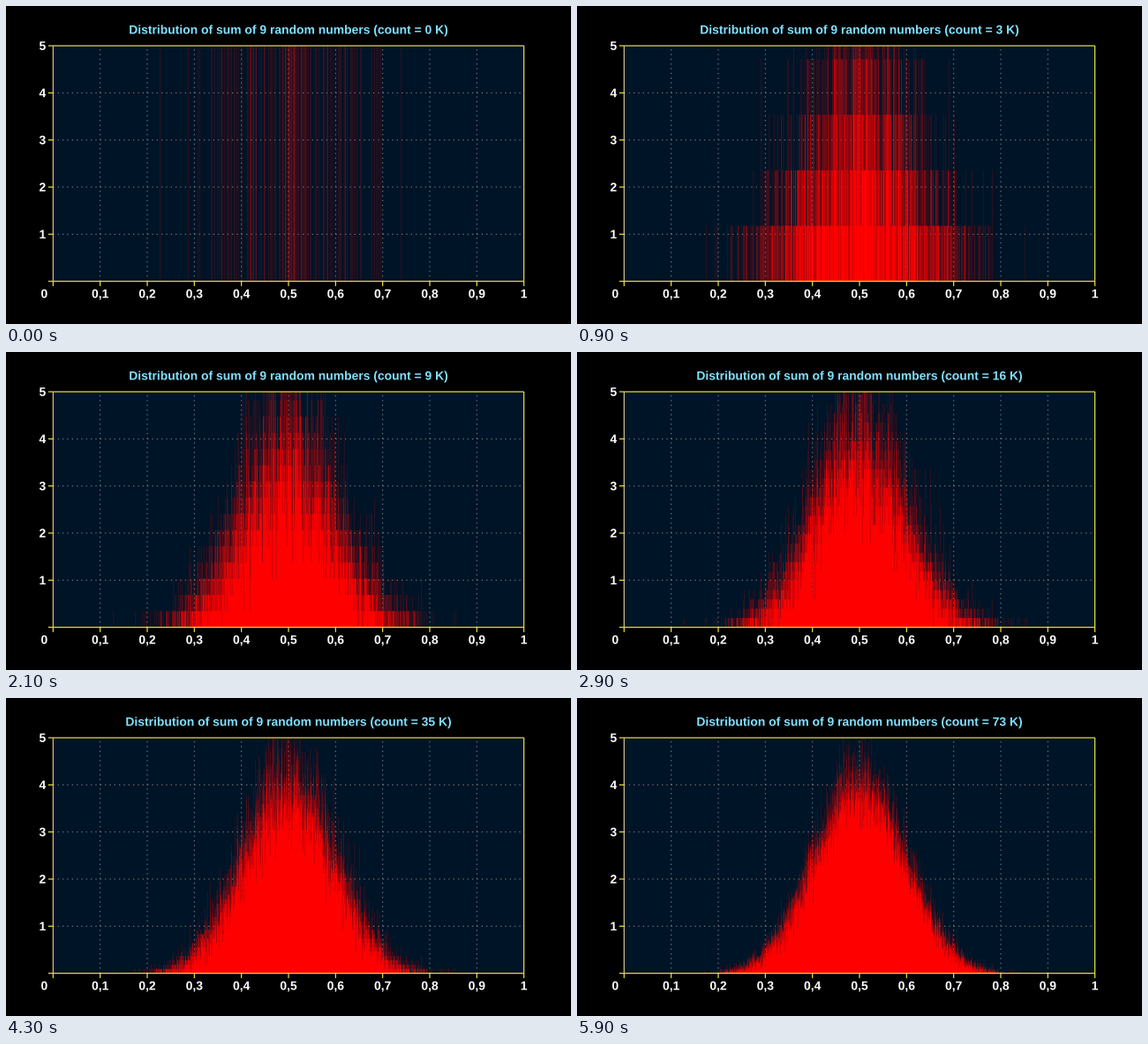
These frames come from a looping animation (640x360 px, 6 s). A matplotlib script:

```python
import matplotlib.pyplot as plt
import numpy as np
from matplotlib.animation import FuncAnimation
from matplotlib.patches import PathPatch
from matplotlib.textpath import TextPath
from matplotlib.transforms import Affine2D

W, H, DPI = 640, 360, 100
FRAMES, INTERVAL = 60, 100
PX = 72 / DPI                       # one pixel in points

LEFT, RIGHT = W / 12, W * 11 / 12
TOP, BOTTOM = 45, 45 + 800 / 3
UNIT = (BOTTOM - TOP) / 5           # pixels per unit of density
STEP = (RIGHT - LEFT) / 10          # pixels per 0.1 of the sum

SUB = 6                             # histogram bins per pixel
BINS = 3200
TERMS = 9

YELLOW, PALE = "#f4f032", "#e0cc96"
GRID, PANEL, TITLE = "#848484", "#001427", "#80e0ff"
FONT_SIZE = 13.89

plt.rcParams["font.family"] = "Liberation Sans"
plt.rcParams["font.weight"] = "bold"

# Sample count in thousands at a few times; its root grows almost evenly.
KNOTS = [0, 5, 13, 21, 37, 49, 59]
COUNTS = [0.13, 1.297, 4.652, 9.3, 25, 46, 73]

rng = np.random.default_rng(3)
means = rng.random((73000, TERMS)).mean(axis=1)
bin_ids = (means * BINS).astype(int)

fig = plt.figure(figsize=(W / DPI, H / DPI), dpi=DPI, facecolor="black")
ax = fig.add_axes([0, 0, 1, 1])
ax.set_xlim(0, W)
ax.set_ylim(H, 0)
ax.axis("off")


def line(x0, y0, x1, y1, color, z, width=1.15, **kw):
    ax.plot([x0, x1], [y0, y1], color=color, lw=width * PX, zorder=z,
            solid_capstyle="butt", snap=False, **kw)


def right_edge(text):
    return TextPath((0, 0), text, size=FONT_SIZE).get_extents().x1


def text_path(x, y, text, align=0.5):
    """Text outline on baseline y; align is the share of it left of x."""
    advance = right_edge(text + "|") - right_edge("|")
    path = TextPath((0, 0), text, size=FONT_SIZE)
    flip = Affine2D().scale(1, -1).translate(x - align * advance, y)
    return path.transformed(flip)


def label(x, y, text, align=0.5, color="white"):
    patch = PathPatch(text_path(x, y, text, align), fc=color, lw=0,
                      snap=False, zorder=6)
    return ax.add_patch(patch)


def title_path(n):
    text = (f"Distribution of sum of {TERMS} random numbers "
            f"(count = {round(n / 1000)} K)")
    return text_path(W / 2, 31.5, text)


def sample_count(i):
    return 1000 * np.interp(i, KNOTS, np.sqrt(COUNTS)) ** 2


def bar_coverage(n):
    """Share of every stage pixel that is covered by the bars."""
    density = np.bincount(bin_ids[:n], minlength=BINS) * BINS / n
    heights = np.zeros(W * SUB)
    start = round(LEFT * SUB)
    heights[start:start + BINS] = np.minimum(density, 5) * UNIT
    base = (BOTTOM - 1 - np.arange(H))[:, None]
    cover = np.clip(heights - base, 0, 1) - np.clip(-base, 0, 1)
    return cover.reshape(H, W, SUB).mean(axis=2)


ax.add_patch(plt.Rectangle((LEFT, TOP), RIGHT - LEFT, BOTTOM - TOP,
                           color=PANEL, lw=0, zorder=1))

dots = dict(width=1, dashes=(1.33, STEP / 10 - 1.33))
for k in range(1, 10):
    x = LEFT + k * STEP
    line(x, BOTTOM, x, TOP, GRID, 2, **dots)
for k in range(1, 5):
    y = BOTTOM - k * UNIT
    line(LEFT, y, RIGHT, y, GRID, 2, **dots)

for k in range(11):
    x = LEFT + k * STEP
    line(x, BOTTOM, x, BOTTOM + 5.5, YELLOW, 5)
    if k:
        label(x, 330.4, "1" if k == 10 else f"0,{k}")
label(LEFT - 10, 330.4, "0")
for k in range(6):
    y = BOTTOM - k * UNIT
    line(LEFT - 5.5, y, LEFT, y, YELLOW, 5)
    if k:
        label(45.2, y + 4.8, str(k), 1)

line(LEFT, TOP, RIGHT, TOP, YELLOW, 4)
line(LEFT, BOTTOM, RIGHT, BOTTOM, YELLOW, 4)
line(RIGHT, TOP, RIGHT, BOTTOM, YELLOW, 4)
line(LEFT, TOP, LEFT, BOTTOM, PALE, 5)

title = ax.add_patch(PathPatch(title_path(0), fc=TITLE, lw=0, snap=False,
                               zorder=6))

rgba = np.zeros((H, W, 4))
rgba[..., 0] = 1
bars = ax.imshow(rgba, extent=(0, W, H, 0), interpolation="nearest",
                 aspect="auto", zorder=3)


def draw(i):
    n = sample_count(i)
    rgba[..., 3] = bar_coverage(round(n))
    bars.set_data(rgba)
    title.set_path(title_path(n))
    return bars, title


anim = FuncAnimation(fig, draw, frames=FRAMES, interval=INTERVAL,
                     repeat=True, repeat_delay=0)
plt.show()
```
